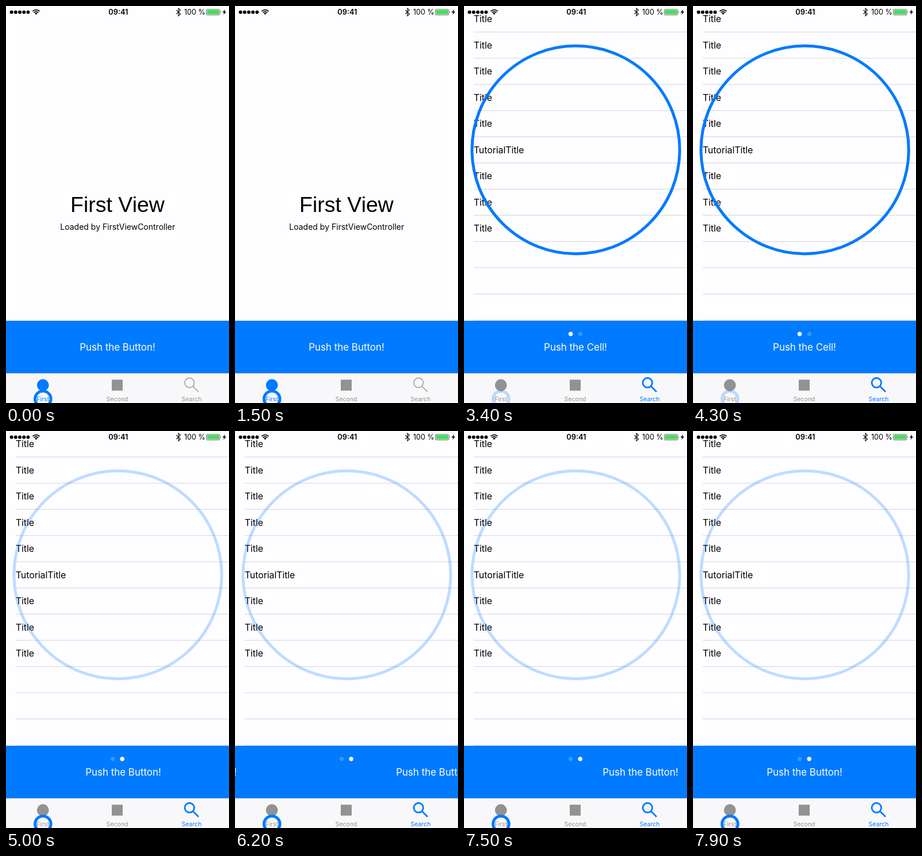
These frames come from a looping animation (388x690 px, 8 s). An HTML page:

```html
<!DOCTYPE html>
<html lang="en">
<head>
<meta charset="utf-8">
<title>Tutorial tabs</title>
<style>
  html, body { margin: 0; width: 100%; height: 100%; overflow: hidden; background: #fefdff; }
  svg { display: block; width: 388px; height: 690px; font-family: Inter, "Open Sans", sans-serif; }
  .mid { text-anchor: middle; }
  .headline { font: 37.5px "Liberation Sans", Arial, sans-serif; }
  .message { font-size: 17px; letter-spacing: -.05px; fill: #fff; }
  .cell { font-size: 16px; letter-spacing: -.1px; }
  .tab { font-size: 10.4px; letter-spacing: .1px; }
  .ring { fill: none; stroke: #007aff; stroke-width: 5; }
</style>
</head>
<body>
<svg viewBox="0 0 388 690">
  <rect width="388" height="690" fill="#fefdff"/>

  <g id="firstView" class="mid">
    <text class="headline" x="194" y="358">First View</text>
    <text x="194.3" y="389" font-size="14">Loaded by FirstViewController</text>
  </g>
  <g id="list"></g>

  <g id="statusBar">
    <g id="signal"></g>
    <g fill="none" stroke="#000" stroke-width="1.7">
      <path d="M46.4 9.2 Q52.5 3.9 58.6 9.2 M48.6 11.5 Q52.5 8.2 56.4 11.5"/>
      <path d="M50.2 12.8 Q52.5 10.9 54.8 12.8 L52.5 15.2Z" fill="#000" stroke="none"/>
      <path d="M296.3 7.2 L303.5 14 L300 17.3 V4 L303.5 7.3 L296.3 14.2" stroke-width="1.1"/>
    </g>
    <text class="mid" x="195.4" y="15" font-size="12.8" font-weight="600">09:41</text>
    <text x="310" y="15" font-size="12.6">100 %</text>
    <rect x="348.5" y="5.7" width="23.6" height="10" rx="1.6" fill="#fefdff" stroke="#444" stroke-width=".7"/>
    <rect x="349.6" y="6.8" width="21.4" height="7.8" rx=".7" fill="#4cd964"/>
    <path d="M373 8.8 q1.6 1.9 0 3.8Z" fill="#444"/>
    <path d="M381.4 5.8 L376.6 11.3 H379.6 L378.2 15.4 L383.2 9.8 H380.2Z"/>
  </g>

  <rect y="547" width="388" height="91.5" fill="#007aff"/>
  <text id="buttonMessage" class="message mid" x="194" y="599">Push the Button!</text>
  <text id="cellMessage" class="message mid" x="194" y="599">Push the Cell!</text>
  <g id="pageDots" fill="#fff">
    <circle id="dot0" cx="185.6" cy="570" r="3.7"/>
    <circle id="dot1" cx="202.2" cy="570" r="3.7"/>
  </g>

  <rect y="638.4" width="388" height="52" fill="#f8f7f9"/>
  <path d="M0 638.5 H388" stroke="#b5b5b8" stroke-width=".8"/>
  <g id="firstTab">
    <circle cx="64.2" cy="659" r="10.4"/>
    <text class="tab mid" x="64.2" y="686.5">First</text>
  </g>
  <g fill="#929292">
    <rect x="184" y="649.5" width="19" height="19"/>
    <text class="tab mid" x="193.6" y="686.5">Second</text>
  </g>
  <g id="searchTab">
    <g id="lens" fill="none">
      <circle cx="319.3" cy="654.8" r="8.3"/>
      <path d="M325.4 660.9 L335 670.4"/>
    </g>
    <text class="tab mid" x="323" y="686.5">Search</text>
  </g>

  <circle id="tabRing" class="ring" cx="64.3" cy="683" r="13.8"/>
  <circle id="cellRing" class="ring" cx="194.6" cy="250" r="180.7"/>
</svg>
<script>
  const LOOP = 8000, STEP = 100, OPEN_LIST = 3400;
  const PAGE = 398, ROW = 45.52;
  const BLUE = '#007aff', GREY = '#929292';
  const el = id => document.getElementById(id);

  // Scroll position over time: two swipes forward, one drag back.
  const scrollKeys = [
    [4500, 0], [4600, 60], [4700, 190], [4800, 310], [4900, 368], [5000, 388], [5100, 396], [5200, PAGE],
    [5900, PAGE], [6000, 382], [6100, 325], [6200, 246], [6300, 203], [6400, 75], [6500, 18], [6600, 0],
    [7300, 0], [7400, 90], [7500, 285], [7600, 362], [7700, 388], [7800, 396], [7900, PAGE]
  ];

  function scrollAt(t) {
    const i = scrollKeys.findIndex(([time]) => time > t);
    if (i === 0) return 0;
    if (i < 0) return PAGE;
    const [t0, a] = scrollKeys[i - 1], [t1, b] = scrollKeys[i];
    return a + (b - a) * (t - t0) / (t1 - t0);
  }

  function build() {
    let rows = '';
    for (let i = 0; i < 12; i++) {
      const line = 45.2 + i * ROW;
      rows += `<path d="M17 ${line} H388" stroke="#d0cfd4" stroke-width=".9"/>`;
      if (i < 9) rows += `<text class="cell" x="16.8" y="${28.1 + i * ROW}">${i === 5 ? 'TutorialTitle' : 'Title'}</text>`;
    }
    el('list').innerHTML = rows;
    el('signal').innerHTML = [0, 1, 2, 3, 4]
      .map(i => `<circle cx="${9.6 + i * 7.2}" cy="10.8" r="3"/>`).join('');
  }

  function show(id, visible) {
    el(id).style.display = visible ? '' : 'none';
  }

  function render(t) {
    const searching = t >= OPEN_LIST;
    const scroll = searching ? scrollAt(t) : 0;
    const page = scroll > PAGE / 2 ? 1 : 0;
    const onButton = !searching || page === 1;

    show('firstView', !searching);
    show('list', searching);
    show('pageDots', searching);
    show('cellMessage', searching);
    show('cellRing', searching);

    el('cellMessage').setAttribute('x', 194 - scroll);
    el('buttonMessage').setAttribute('x', searching ? 194 + PAGE - scroll : 194);
    el('dot0').setAttribute('opacity', page ? .22 : 1);
    el('dot1').setAttribute('opacity', page ? 1 : .22);
    el('tabRing').setAttribute('opacity', onButton ? 1 : .25);
    el('cellRing').setAttribute('opacity', onButton ? .25 : 1);

    const searchColor = searching ? BLUE : GREY;
    el('firstTab').setAttribute('fill', searching ? GREY : BLUE);
    el('searchTab').setAttribute('fill', searchColor);
    el('lens').setAttribute('stroke', searchColor);
    el('lens').setAttribute('stroke-width', searching ? 2.8 : 1.4);
  }

  build();
  const start = performance.now();
  function tick() {
    const t = (performance.now() - start) % LOOP;
    render(Math.floor(t / STEP) * STEP);
    requestAnimationFrame(tick);
  }
  tick();
</script>
</body>
</html>
```
